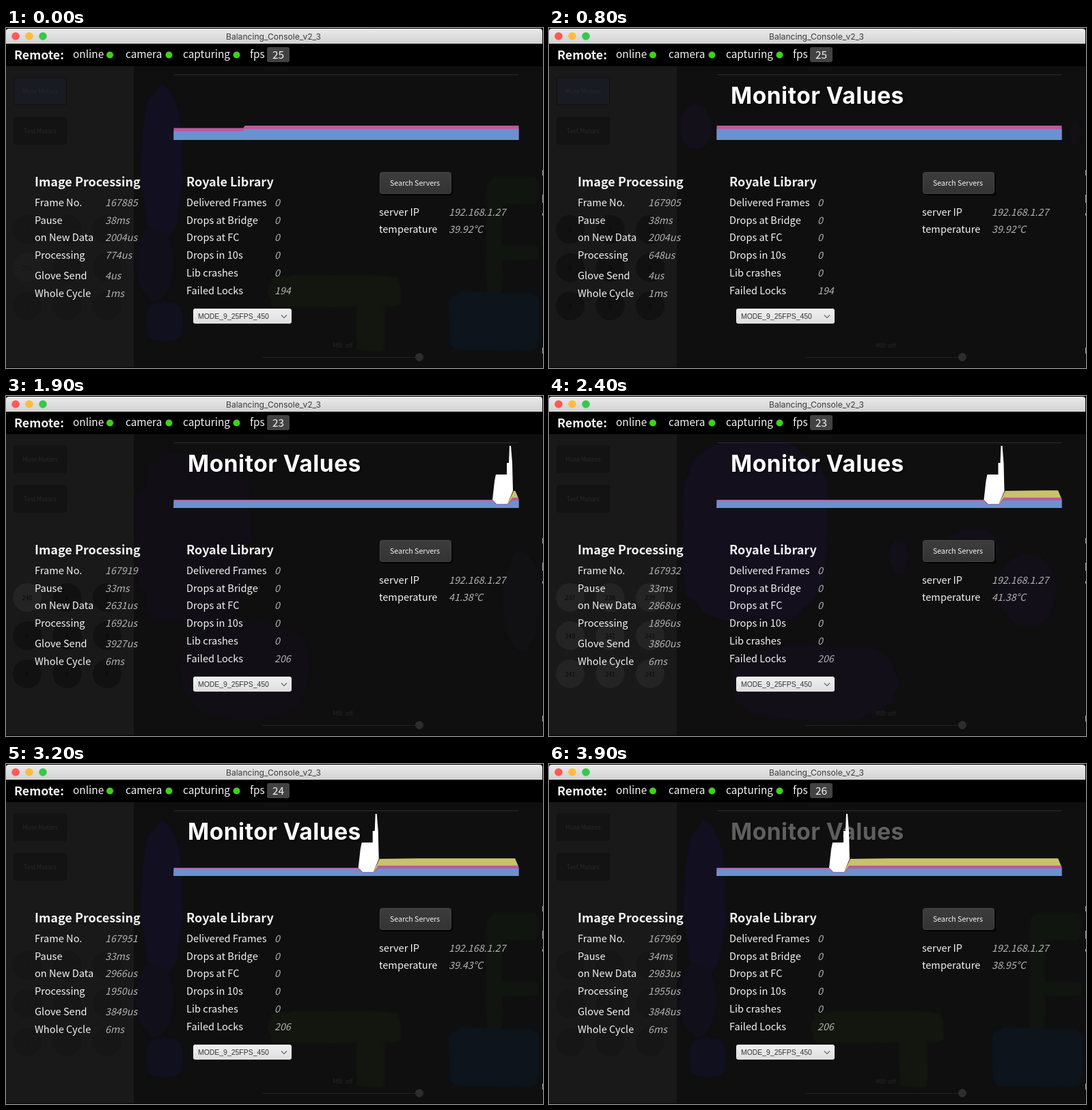
Write an HTML page that moves like this. It is 786 px wide and 498 px high and loops after 4 s.

```html
<!DOCTYPE html>
<html lang="en">
<head>
<meta charset="utf-8">
<title>Monitor</title>
<style>
html, body { margin: 0; width: 100%; height: 100%; overflow: hidden; background: #000; }
svg { display: block; width: 786px; height: 498px; }
text { font-family: "Noto Sans CJK JP", "Noto Sans CJK SC", "Noto Sans", sans-serif; fill: #f4f4f4; white-space: pre; }
.label { font-size: 14.6px; }
.value { font-size: 14.3px; font-style: italic; font-weight: 300; fill: #b2b2b2; }
.head { font-size: 18px; font-weight: 700; }
.bar { font-size: 15.4px; }
.remote { font-size: 17.7px; font-weight: 700; }
.dim { font-size: 9px; fill: #080808; text-anchor: middle; }
.title { font: 700 33.5px Inter, sans-serif; letter-spacing: .5px; fill: #fff; }
</style>
</head>
<body>
<svg viewBox="0 0 786 498">
  <defs>
    <linearGradient id="chrome" x2="0" y2="1"><stop stop-color="#ebebeb"/><stop offset="1" stop-color="#d1d1d1"/></linearGradient>
    <linearGradient id="btn" x2="0" y2="1"><stop stop-color="#3d3d3d"/><stop offset="1" stop-color="#333"/></linearGradient>
    <linearGradient id="drop" x2="0" y2="1"><stop stop-color="#f0f0f0"/><stop offset="1" stop-color="#dedede"/></linearGradient>
    <clipPath id="plot"><rect x="245.5" y="70" width="505" height="94"/></clipPath>
    <clipPath id="edge"><path d="M245 70H745V138L750.5 151V165H245Z"/></clipPath>
    <filter id="soft" color-interpolation-filters="sRGB"><feGaussianBlur stdDeviation="1"/></filter>
  </defs>

  <rect width="786" height="498" fill="#050505"/>
  <rect y="56" width="785" height="441" fill="#0f0f10"/>
  <rect y="56" width="187" height="441" fill="#191919"/>
  <g id="depth" filter="url(#soft)"></g>
  <g id="side"></g>

  <path d="M246 68.5H750" stroke="#2b2b2b"/>
  <path d="M375 482.5H600" stroke="#202020"/>
  <circle cx="605" cy="482" r="6" fill="#2d2d2d"/>
  <text class="dim" x="493" y="468" style="fill:#262626">MB: off</text>

  <g id="title">
    <text class="title" x="268" y="113" style="fill:#000" opacity=".6" filter="url(#soft)">Monitor Values</text>
    <text class="title" x="266" y="111">Monitor Values</text>
  </g>

  <g clip-path="url(#plot)">
    <g id="bands"><path id="yellow" fill="#c9c26b"/><path id="pink" fill="#bd5a9a"/></g>
    <path id="white" fill="#fff"/>
    <path id="blue" fill="#6d90cf"/>
  </g>

  <rect y="23" width="785" height="33" fill="#000"/>
  <path d="M0 23V5Q0 1 4 1H781Q785 1 785 5V23Z" fill="url(#chrome)"/>
  <circle cx="14" cy="12" r="5.8" fill="#fc5b57"/>
  <circle cx="34" cy="12" r="5.8" fill="#fdbc40"/>
  <circle cx="54" cy="12" r="5.8" fill="#34c84a"/>
  <text x="391.5" y="16.5" text-anchor="middle" style="font:12.1px Inter,sans-serif;fill:#3c3c3c">Balancing_Console_v2_3</text>
  <path d="M785.5 208V216M785.5 244V256M785.5 271V275M785.5 468V477" stroke="#aaa"/>

  <g id="info"></g>
  <rect x="382" y="28" width="33" height="22" rx="3" fill="#424242"/>
  <text class="bar" id="fps" x="398.5" y="45" text-anchor="middle"></text>

  <rect x="549" y="213" width="105" height="32" rx="4" fill="#000"/>
  <rect x="547.5" y="211.5" width="104" height="31" rx="3" fill="url(#btn)" stroke="#474747"/>
  <text x="598.5" y="231" text-anchor="middle" font-size="10.6">Search Servers</text>
  <rect x="274" y="411" width="144" height="22" rx="3" fill="url(#drop)"/>
  <text x="281" y="426" style="font:10.45px 'Liberation Sans',Arial,sans-serif;fill:#333">MODE_9_25FPS_450</text>
  <path d="M403 420.5L407 424.5 411 420.5" fill="none" stroke="#666" stroke-width="1.2"/>
</svg>

<script>
const LOOP = 4000, STEP = 100, SPEED = 0.151, STALL = 1700, FIRST = 1900;
const $ = id => document.getElementById(id);
const clamp = v => Math.min(1, Math.max(0, v));
const ramp = (t, from, to) => clamp((t - from) / (to - from));
const settle = (t, from, to, tau) => Math.round(to + (from - to) * Math.exp(-Math.max(0, t - FIRST) / tau));
// Fades in after a and out before b
const pulse = (t, a, b, fade = 300) => Math.min(ramp(t, a, a + fade), ramp(t, b, b - fade));

function add(parent, tag, attrs, content = '') {
  const el = document.createElementNS('http://www.w3.org/2000/svg', tag);
  for (const k in attrs) el.setAttribute(k, attrs[k]);
  el.textContent = content;
  parent.append(el);
  return el;
}

// Labels and readings
const info = $('info');
const text = (cls, x, y, str, id = '') => add(info, 'text', { class: cls, x, y, id }, str);
const reading = (x, gap, y, name, id, str = '') => {
  text('label', x, y, name);
  text('value', x + gap, y, str, id);
};
text('remote', 12, 46, 'Remote:');
[['online', 98, 152], ['camera', 175, 238.5], ['capturing', 259, 337.5]].forEach(([name, x, cx]) => {
  text('bar', x, 44, name);
  add(info, 'circle', { cx, cy: 39.5, r: 5, fill: '#3fd01c' });
});
text('bar', 357, 44, 'fps');
text('head', 42, 232, 'Image Processing');
text('head', 264, 232, 'Royale Library');
['Frame No.', 'Pause', 'on New Data', 'Processing', 'Glove Send', 'Whole Cycle'].forEach((name, i) =>
  reading(42, 103, Math.round(261 + i * 25.6 + (i > 3 ? 5 : 0)), name, name));
['Delivered Frames', 'Drops at Bridge', 'Drops at FC', 'Drops in 10s', 'Lib crashes', 'Failed Locks'].forEach((name, i) =>
  reading(264, 129, Math.round(261 + i * 25.7), name, name, '0'));
reading(546, 102, 275, 'server IP', 'ip', '192.168.1.27');
reading(546, 102, 300, 'temperature', 'temp');

// Dimmed controls behind the overlay
const side = $('side');
const buttons = ['Mute Motors', 'Test Motors'].map((name, i) => {
  const y = 73 + i * 58;
  const box = add(side, 'rect', { x: 11.5, y, width: 77, height: 39, rx: 2, fill: '#131313', stroke: '#101010' });
  add(side, 'text', { class: 'dim', x: 50, y: y + 23, style: 'fill:#292929' }, name);
  return box;
});
const motors = add(side, 'g', {});
const knobs = Array.from({ length: 9 }, (_, i) => {
  const x = 31 + (i % 3) * 58.5, y = 295 + Math.floor(i / 3) * 56;
  return {
    disc: add(motors, 'circle', { cx: x, cy: y, r: 21 }),
    num: add(motors, 'text', { class: 'dim', x, y: y + 4 })
  };
});

// Ragged patches of the depth camera; a low power makes them boxy
let seed = 7;
const rand = () => (seed = seed * 16807 % 2147483647) / 2147483647;
function blob(cx, cy, rx, ry, power = 1) {
  const bend = v => Math.sign(v) * Math.abs(v) ** power;
  return area(Array.from({ length: 32 }, (_, i) => {
    const a = i * Math.PI / 16, r = 0.95 + rand() * 0.1;
    return [cx + rx * r * bend(Math.cos(a)), cy + ry * r * bend(Math.sin(a))];
  }));
}
function area(pts) {
  return 'M' + pts.map(p => p.join(' ')).join('L') + 'Z';
}
function layer(from, to, patches) {
  const el = add($('depth'), 'g', {});
  patches.forEach(([fill, ...shape]) => add(el, 'path', { fill, d: blob(...shape) }));
  return t => el.setAttribute('opacity', Math.max(pulse(t, from, to), pulse(t + LOOP, from, to)));
}
const layers = [
  layer(2700, 4500, [
    ['#120f20', 228, 200, 31, 115], ['#110f19', 218, 345, 28, 55], ['#10101f', 232, 430, 26, 28, 0.5],
    ['#12160e', 480, 386, 95, 24, 0.3], ['#12160e', 534, 440, 21, 33, 0.2],
    ['#10150f', 744, 238, 35, 20, 0.2], ['#10150f', 715, 305, 12, 85, 0.2],
    ['#10150f', 750, 329, 29, 11, 0.2], ['#0e141b', 715, 430, 65, 43, 0.3]
  ]),
  layer(400, 1100, [['#13101a', 215, 145, 24, 32], ['#121013', 770, 155, 8, 18]]),
  layer(1200, 1900, [['#111012', 260, 250, 60, 180, 0.7], ['#111012', 551, 140, 10, 58, 0.4]]),
  layer(1600, 2300, [['#110f15', 275, 210, 85, 130, 0.7], ['#110f15', 350, 400, 95, 72, 0.8], ['#111013', 755, 300, 28, 75]]),
  layer(2000, 2800, [['#130f1d', 300, 200, 108, 130, 0.6], ['#120f18', 390, 420, 120, 55, 0.7],
    ['#120f19', 512, 235, 14, 26], ['#120f18', 620, 220, 40, 26], ['#120f18', 700, 285, 42, 55]])
];

function drawChart(t) {
  const late = t >= STALL;
  const x = late ? 738 - SPEED * (t - FIRST) : 350 - SPEED * t;
  // Profile points are relative to x; the last level runs on to the right
  const band = (id, ...pts) => {
    const line = pts.map(([dx, y]) => [x + dx, y]);
    $(id).setAttribute('d', area([[0, pts[0][1]], ...line, [1400, pts.at(-1)[1]], [1400, 164], [0, 164]]));
  };
  const dip = (id, top, low, end) => band(id, [-26, top], [-21, low], [-3, low], [3, end]);
  $('white').setAttribute('display', late ? 'inline' : 'none');
  $('yellow').setAttribute('display', late ? 'inline' : 'none');
  $('bands').setAttribute('clip-path', late ? 'url(#edge)' : 'none');
  if (!late) {
    band('blue', [-3, 151], [0, 148]);
    band('pink', [-3, 146.5], [0, 143]);
    return;
  }
  dip('blue', 153.5, 158.5, 153);
  dip('pink', 152, 157.5, 148.7);
  band('yellow', [-900, 164], [-4, 158], [5, 139], [60, 138.3]);
  const spike = [[-26, 152], [-23, 125], [-21, 115], [-5, 115], [-5, 98], [-2, 98],
    [-1, 73], [1, 73], [3, 98], [4, 139], [-4, 158], [-20, 158]];
  $('white').setAttribute('d', area(spike.map(([dx, y]) => [x + dx, y])));
}

function drawValues(t) {
  const set = (id, v) => { $(id).textContent = v; };
  const late = t >= STALL;
  const phase = late + (t >= 2800) + (t >= 3600);
  set('Frame No.', 167885 + Math.round(t / 40.2 - 13.15 * ramp(t, 800, FIRST)));
  set('Pause', [38, 33, 33, 34][phase] + 'ms');
  set('on New Data', (late ? settle(t, 2631, 2987, 456) : 2004) + 'us');
  set('Processing', (late ? settle(t, 1692, 1956, 337)
    : Math.round(639.7 + 1.18e-4 * (t - 1067) ** 2)) + 'us');
  set('Glove Send', (late ? settle(t, 3927, 3848, 265) : 4) + 'us');
  set('Whole Cycle', late ? '6ms' : '1ms');
  set('Failed Locks', late ? 206 : 194);
  set('temp', ['39.92', '41.38', '39.43', '38.95'][phase] + '°C');
  set('fps', [25, 23, 24, 26][phase]);
}

function drawBackdrop(t) {
  layers.forEach(update => update(t));
  $('title').setAttribute('opacity', pulse(t, 200, LOOP));
  buttons[0].setAttribute('fill', t < STALL ? '#191b23' : '#131313');
  motors.setAttribute('opacity', 0.3 + 0.7 * pulse(t, 200, 3000, 400));
  const all = t >= 2200 && t < 2800;
  knobs.forEach(({ disc, num }, i) => {
    const lit = all || (i === 3 && t < 300) || (i === 0 && t >= FIRST && t < 2200);
    disc.setAttribute('fill', lit ? '#242424' : '#111');
    num.textContent = !lit ? 0 : t < 300 ? 206 : all ? 237 + Math.min(4, i) : 240;
  });
}

function frame(now) {
  const t = Math.floor((now % LOOP) / STEP) * STEP;
  drawBackdrop(t);
  drawChart(t);
  drawValues(t);
  requestAnimationFrame(frame);
}
frame(0);
</script>
</body>
</html>
```
